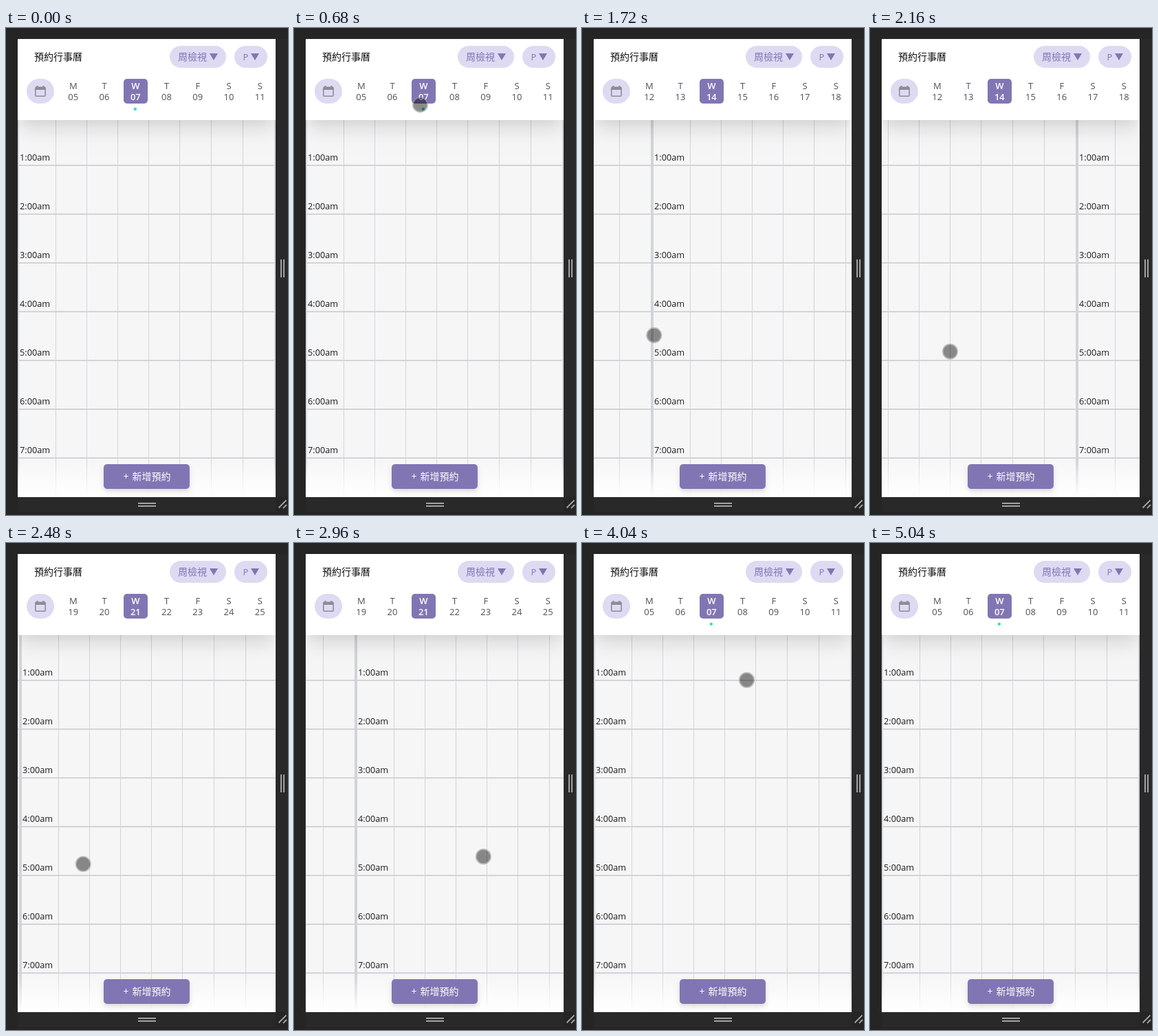
Animation of 410 by 709 pixels, one loop 5.28 s. Source, as an HTML page with a canvas:

```html
<!DOCTYPE html>
<html lang="zh-Hant">
<head>
<meta charset="utf-8">
<title>預約行事曆</title>
<style>
html, body { margin: 0; width: 100%; height: 100%; overflow: hidden; background: #252525; }
canvas { display: block; width: 410px; height: 709px; }
</style>
</head>
<body>
<canvas id="stage" width="410" height="709"></canvas>
<script>
const ctx = document.getElementById('stage').getContext('2d');
const LOOP = 5280, SNAP = 300;
const VIEW = { x: 17, y: 16, w: 375, h: 667 };
const PURPLE = '#8176b3', LILAC = '#dedaf2', LINE = '#d2d4da', GREY = '#a3a3a3';
const LATIN = '"Open Sans", "Noto Sans", sans-serif';
const CJK = '"Noto Sans CJK TC", "Noto Sans CJK", sans-serif';

// Touch gestures. A turn marks the move leading to that point as a swipe by one week.
const MOVES = [
  { t: 80, x: 115, y: 494 },
  { t: 400, x: 214, y: 106 },
  { t: 600, x: 183.5, y: 112 },
  { t: 800, x: 183.5, y: 111 },
  { t: 1320, x: 284.5, y: 426.5 },
  { t: 1600, x: 95, y: 445 },
  { t: 2040, x: 207.5, y: 471 },
  { t: 2240, x: 67, y: 471 },
  { t: 2860, x: 202.5, y: 460 },
  { t: 3040, x: 327.5, y: 454 },
  { t: 3480, x: 219.5, y: 467.5 },
  { t: 3620, x: 340, y: 460 },
  { t: 4040, x: 239.5, y: 199.5 },
  { t: 4280, x: 193.5, y: 122 },
  { t: 4880, x: 385, y: 661 }
];
const TURNS = { 1600: 1, 2240: 1, 3040: -1, 3620: -1 };

// The picture refreshes every 80 ms, with one short step per 1400 ms.
const tick = t => t - ((t + 1200) % 1400) % 80;
const mix = (a, b, k) => a + (b - a) * k;
const smooth = k => k * k * (3 - 2 * k);

function pointer(t) {
  const i = MOVES.findIndex(m => m.t > t);
  if (i < 1) return null;
  const a = MOVES[i - 1], b = MOVES[i];
  const k = smooth((t - a.t) / (b.t - a.t));
  return { x: mix(a.x, b.x, k), y: mix(a.y, b.y, k) };
}

function calendar(t) {
  let week = 0, scroll = 0;
  MOVES.forEach((end, i) => {
    const turn = TURNS[end.t], start = MOVES[i - 1];
    if (!turn || t < start.t) return;
    const finger = t < end.t ? pointer(t) : end;
    scroll = week * VIEW.w + start.x - finger.x;
    if (t < end.t) return;
    week += turn;
    const k = Math.min(1, (t - end.t) / SNAP);
    scroll = mix(scroll, week * VIEW.w, 1 - (1 - k) ** 2.5);
  });
  return { week, scroll: Math.round(scroll) };
}

function rect(x, y, w, h, fill) {
  ctx.fillStyle = fill;
  ctx.fillRect(x, y, w, h);
}

function pill(x, y, w, h, r, fill) {
  ctx.fillStyle = fill;
  ctx.beginPath();
  ctx.roundRect(x, y, w, h, r);
  ctx.fill();
}

function disc(x, y, r, fill) {
  ctx.fillStyle = fill;
  ctx.beginPath();
  ctx.arc(x, y, r, 0, 7);
  ctx.fill();
}

function text(s, x, y, fill, font, align = 'left') {
  ctx.font = font;
  ctx.textAlign = align;
  ctx.fillStyle = fill;
  ctx.fillText(s, x, y);
}

function arrow(x, y) {
  ctx.fillStyle = PURPLE;
  ctx.beginPath();
  ctx.moveTo(x, y);
  ctx.lineTo(x + 12, y);
  ctx.lineTo(x + 6, y + 10);
  ctx.fill();
}

function shadow(dy, blur, alpha, draw) {
  ctx.save();
  ctx.shadowColor = `rgba(0,0,0,${alpha})`;
  ctx.shadowOffsetY = dy;
  ctx.shadowBlur = blur;
  draw();
  ctx.restore();
}

function drawFrame() {
  rect(0, 0, 410, 709, '#252525');
  rect(392, 16, 18, 667, '#292929');
  rect(17, 683, 375, 22, '#292929');
  for (const d of [0, 4]) {
    rect(399 + d, 337, 2, 26, GREY);
    rect(192, 691 + d, 26, 2, GREY);
  }
  ctx.strokeStyle = GREY;
  ctx.lineWidth = 1.8;
  ctx.beginPath();
  ctx.moveTo(396.5, 698.5);
  ctx.lineTo(407.5, 687.5);
  ctx.moveTo(403, 699);
  ctx.lineTo(408, 694);
  ctx.stroke();
}

function drawPage(x) {
  if (x <= VIEW.x - VIEW.w || x >= VIEW.x + VIEW.w) return;
  for (let i = 0; i < 7; i++) {
    // The last columns are a pixel wider.
    rect(x + 55 + i * 45 + Math.max(0, i - 4), 134, 1, 549, LINE);
    rect(x, 199 + i * 71, VIEW.w, 2, LINE);
  }
  rect(x, 134, 2, 549, LINE);
  rect(x + VIEW.w - 2, 134, 2, 549, LINE);
  for (let i = 0; i < 8; i++) {
    text(`${i + 1}:00am`, x + 3, 193 + i * 71, '#1c1c1c', `12.7px ${LATIN}`);
  }
}

function drawIcon() {
  const grey = '#8e8c93';
  pill(42, 85.5, 16, 14.5, 2, grey);
  rect(43.6, 90, 12.8, 8.5, LILAC);
  rect(44.5, 84, 2, 2, grey);
  rect(53.5, 84, 2, 2, grey);
}

function drawHeader(week) {
  shadow(20, 25, 0.1, () => rect(22, 21, 365, 108, '#fff'));
  shadow(10, 10, 0.04, () => rect(22, 21, 365, 108, '#fff'));
  rect(17, 16, 375, 118, '#fff');

  text('預約行事曆', 41, 47, '#111', `14px ${CJK}`);
  pill(238, 26, 82, 32, 16, LILAC);
  text('周檢視', 250, 47, PURPLE, `14px ${CJK}`);
  arrow(296, 37);
  pill(332, 26, 48, 32, 16, LILAC);
  text('P', 344.5, 47, PURPLE, `13px ${LATIN}`);
  arrow(356, 37);

  pill(30, 74, 40, 36, 18, LILAC);
  drawIcon();
  pill(171, 74, 35, 36, 5, PURPLE);
  [...'MTWTFSS'].forEach((day, i) => {
    const on = i === 2, x = 97.8 + i * 45.25;
    const color = on ? '#fff' : '#4b5058';
    const font = `${on ? 600 : 400} 13px ${LATIN}`;
    const date = String(5 + week * 7 + i).padStart(2, '0');
    text(day, x, 89, color, font, 'center');
    text(date, x, 105, color, font, 'center');
  });
  if (week === 0) disc(187.8, 118, 2.3, '#3ce0c3');
}

function drawFooter() {
  const fade = ctx.createLinearGradient(0, 627, 0, 683);
  fade.addColorStop(0, 'rgba(255,255,255,0)');
  fade.addColorStop(1, '#fff');
  rect(17, 627, 375, 56, fade);
  shadow(4, 6, 0.12, () => pill(142, 635, 125, 36, 5, PURPLE));
  text('+', 170.5, 658, '#fff', `14px ${LATIN}`);
  text('新增預約', 183.5, 658, '#fff', `500 14px ${CJK}`);
}

function drawPointer(p) {
  disc(p.x, p.y, 10, 'rgba(0,0,0,0.45)');
  ctx.strokeStyle = 'rgba(150,150,150,0.65)';
  ctx.lineWidth = 1.6;
  ctx.beginPath();
  ctx.arc(p.x, p.y, 10.7, 0, 7);
  ctx.stroke();
}

function render(now) {
  const t = tick(now % LOOP);
  const { week, scroll } = calendar(t);
  const touch = pointer(t);
  drawFrame();
  ctx.save();
  ctx.beginPath();
  ctx.rect(VIEW.x, VIEW.y, VIEW.w, VIEW.h);
  ctx.clip();
  rect(VIEW.x, VIEW.y, VIEW.w, VIEW.h, '#f6f6f6');
  for (let i = 0; i < 3; i++) drawPage(VIEW.x + i * VIEW.w - scroll);
  drawFooter();
  drawHeader(week);
  ctx.restore();
  if (touch) drawPointer(touch);
}

const begin = performance.now();
function loop() {
  render(performance.now() - begin);
  requestAnimationFrame(loop);
}
loop();
</script>
</body>
</html>
```
